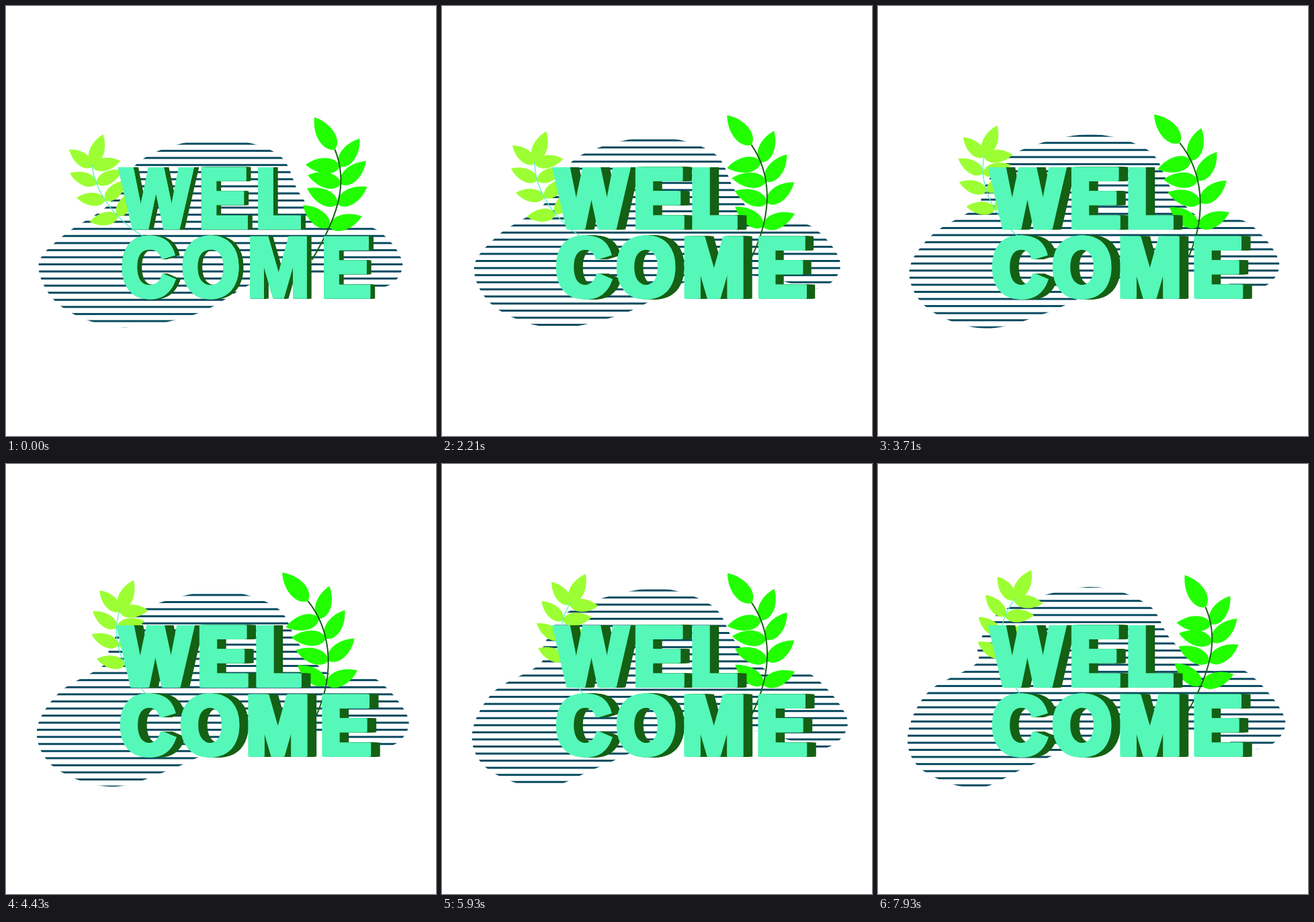
These frames come from a looping animation (640x640 px, 8000 ms). An HTML page with a canvas:

```html
<!DOCTYPE html>
<html lang="en">
<head>
<meta charset="utf-8">
<title>Welcome</title>
<style>
  html, body { margin: 0; width: 100%; height: 100%; overflow: hidden; background: #fff; }
  canvas { display: block; width: 100vw; height: 100vh; }
</style>
</head>
<body>
<canvas id="stage" width="640" height="640"></canvas>
<script>
const ctx = document.getElementById('stage').getContext('2d');
const LOOP = 8;
const DARK = '#146014';

const clamp = p => Math.min(1, Math.max(0, p));
const mix = (a, b, p) => a + (b - a) * p;
const sineEase = p => 0.5 - 0.5 * Math.cos(Math.PI * clamp(p));
const smooth = p => { p = clamp(p); return p * p * (3 - 2 * p); };

// Key points of the cloud outline: x, y at the start, then x, y at the end.
const CLOUD = [
  [312, 197.5, 312, 183], [404, 220, 400, 208], [437, 279, 436, 261],
  [475, 324, 490, 306], [548, 331, 548, 309], [590, 382, 606, 381],
  [560, 419, 568, 424], [470, 403, 475, 398], [380, 408, 370, 391],
  [284, 458, 226, 449], [170, 478, 148, 482], [82, 447, 68, 457],
  [48.5, 387, 44, 407], [85, 342, 74, 340], [148, 300, 145, 298],
  [165, 270, 150, 268], [215, 221, 188, 217]
];

// Closed smooth curve through the key points.
function cloudPath(s) {
  const pts = CLOUD.map(([x, y, u, v]) => [mix(x, u, s), mix(y, v, s)]);
  const at = i => pts[(i + pts.length) % pts.length];
  ctx.beginPath();
  ctx.moveTo(...pts[0]);
  pts.forEach((b, i) => {
    const a = at(i - 1), c = at(i + 1), d = at(i + 2);
    ctx.bezierCurveTo(
      b[0] + (c[0] - a[0]) / 6, b[1] + (c[1] - a[1]) / 6,
      c[0] - (d[0] - b[0]) / 6, c[1] - (d[1] - b[1]) / 6, ...c);
  });
  ctx.closePath();
}

function drawCloud(t) {
  const gap = 10.56;
  ctx.save();
  cloudPath(sineEase(t / LOOP));
  ctx.clip();
  ctx.fillStyle = '#084a60';
  for (let y = 205 + 2.5 * t - 5 * gap; y < 490; y += gap) ctx.fillRect(0, y - 1.5, 640, 3);
  ctx.restore();
}

// Each stem is a cubic curve that bends from one pose to another.
// Angles are in degrees clockwise from upright; "step" is the change per pair
// of leaves, "turn" and "turnStep" the extra rotation of the bent pose.
const LEFT_PLANT = {
  leaf: '#9cff33', stem: '#55f0c8', width: 1.3,
  from: [128, 236, 132, 275, 160, 318, 210, 346],
  to: [205, 200, 178, 232, 170, 285, 213, 345],
  first: 0.03, spacing: 0.21, length: 43,
  right: 78, left: -53, step: -16, turn: 18, turnStep: 8,
  tip: 20, tipTurn: 9, tipLength: 48
};
const RIGHT_PLANT = {
  leaf: '#22ff00', stem: DARK, width: 2,
  from: [491, 214, 507, 255, 503, 300, 455, 378],
  to: [450, 204, 482, 244, 492, 306, 462, 374],
  first: 0.2, spacing: 0.19, length: 51,
  right: 36, left: -86, step: 12, turn: -18, turnStep: 4,
  tip: -32, tipTurn: -10, tipLength: 57
};

function drawLeaf(x, y, degrees, size) {
  ctx.save();
  ctx.translate(x, y);
  ctx.rotate(degrees * Math.PI / 180);
  ctx.scale(size, size);
  ctx.beginPath();
  ctx.moveTo(0, 0);
  ctx.bezierCurveTo(-0.28, -0.1, -0.32, -0.6, 0, -1);
  ctx.bezierCurveTo(0.32, -0.6, 0.28, -0.1, 0, 0);
  ctx.fill();
  ctx.restore();
}

function drawPlant(plant, bend) {
  const curve = plant.from.map((v, i) => mix(v, plant.to[i], bend));
  const [x, y, ...rest] = curve;
  const along = (p, axis) => {
    const q = 1 - p, c = i => curve[2 * i + axis];
    return q * q * q * c(0) + 3 * q * q * p * c(1) + 3 * q * p * p * c(2) + p * p * p * c(3);
  };
  ctx.fillStyle = plant.leaf;
  drawLeaf(x, y, plant.tip + plant.tipTurn * bend, plant.tipLength);
  for (let i = 0; i < 4; i++) {
    const p = plant.first + plant.spacing * i;
    const turn = plant.step * i + (plant.turn + plant.turnStep * i) * bend;
    for (const side of [plant.left, plant.right]) {
      drawLeaf(along(p, 0), along(p, 1), side + turn, plant.length);
    }
  }
  ctx.strokeStyle = plant.stem;
  ctx.lineWidth = plant.width;
  ctx.beginPath();
  ctx.moveTo(x, y);
  ctx.bezierCurveTo(...rest);
  ctx.stroke();
}

function drawPlants(t) {
  drawPlant(LEFT_PLANT, sineEase((t - 0.45) / 7.55));
  drawPlant(RIGHT_PLANT, 0.4 + 0.63 * Math.cos(0.54 * (t - 4.05)));
}

const ROWS = [
  { text: 'WEL', base: 329.3, lefts: [167.5, 290.5, 375] },
  { text: 'COME', base: 432.1, lefts: [172.5, 262.5, 363, 473] }
];
const LETTERS = ROWS.flatMap(({ text, base, lefts }) =>
  [...text].map((ch, i) => ({ ch, base, left: lefts[i] })));
const FONT = 'bold 124px "Liberation Sans", Arial, sans-serif';
const WEIGHT = 7;
const CONDENSE = 0.9;

// Repeats a letter sideways so that it sweeps from one offset to the other.
function sweep({ ch, base, left }, from, to, colour) {
  const steps = Math.max(1, Math.ceil((to - from) / 1.5));
  const ink = ctx.measureText(ch).actualBoundingBoxLeft + WEIGHT / 2;
  ctx.fillStyle = ctx.strokeStyle = colour;
  for (let i = 0; i <= steps; i++) {
    ctx.save();
    ctx.translate(left + mix(from, to, i / steps), base);
    ctx.scale(CONDENSE, 1);
    ctx.strokeText(ch, ink, 0);
    ctx.fillText(ch, ink, 0);
    ctx.restore();
  }
}

function drawText(t) {
  ctx.font = FONT;
  ctx.lineWidth = WEIGHT;
  ctx.lineJoin = 'miter';
  ctx.miterLimit = 3;
  const grow = LETTERS.map((_, i) => smooth((t + 0.21 - 0.2 * i) / 1.68));
  LETTERS.forEach((l, i) => sweep(l, 0, 7 + 7.5 * grow[i], DARK));
  LETTERS.forEach((l, i) => sweep(l, -3 * grow[i], grow[i], '#55f8b9'));
}

function frame(now) {
  const t = now / 1000 % LOOP;
  ctx.fillStyle = '#fff';
  ctx.fillRect(0, 0, 640, 640);
  drawCloud(t);
  drawPlants(t);
  drawText(t);
  requestAnimationFrame(frame);
}
requestAnimationFrame(frame);
</script>
</body>
</html>
```
